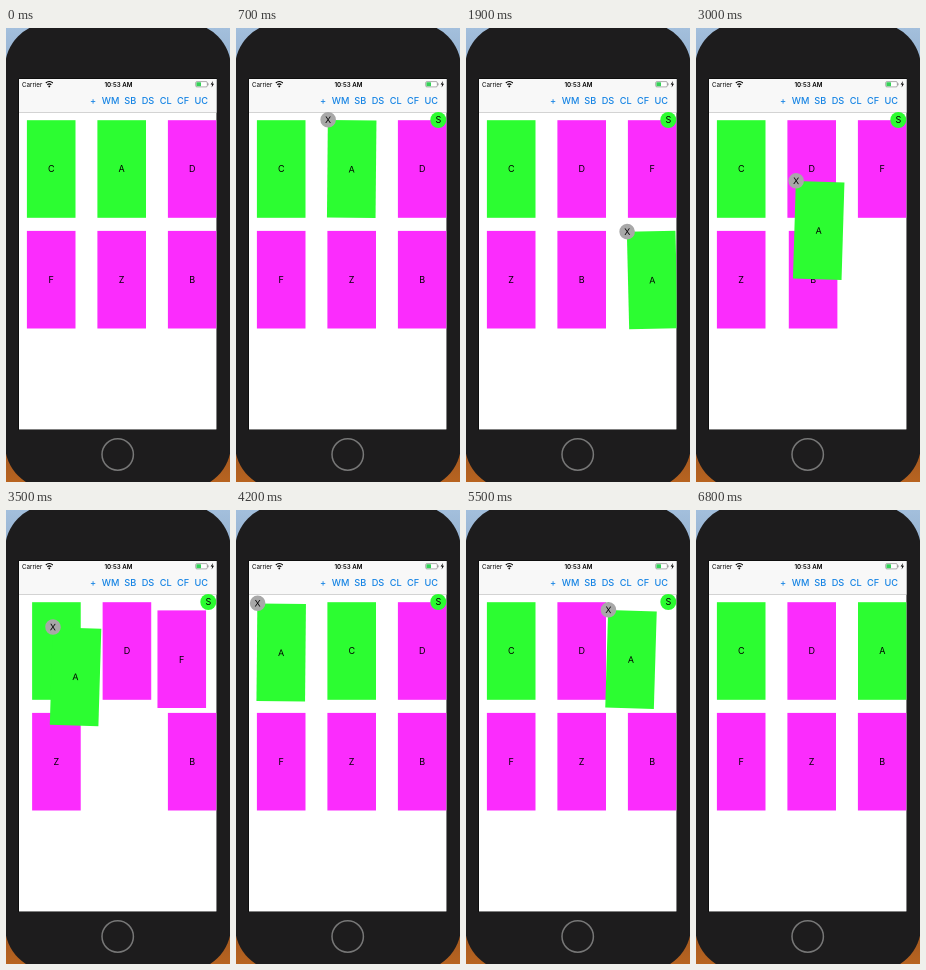
These frames come from a looping animation (224x454 px, 7.1 s). An HTML page:

```html
<!DOCTYPE html>
<html lang="en">
<head>
<meta charset="utf-8">
<title>Reordering cards</title>
<style>
  html, body { margin: 0; width: 100%; height: 100%; overflow: hidden; }
  svg { display: block; width: 224px; height: 454px; font-family: Inter, sans-serif; }
  text { text-anchor: middle; }
  .label { font-size: 9px; }
  .nav { font-size: 9.2px; fill: #1684e4; font-weight: 500; }
</style>
</head>
<body>
<svg viewBox="0 0 224 454">
  <defs>
    <linearGradient id="desk" x2="0" y2="1">
      <stop offset="0" stop-color="#a3bfdc"/>
      <stop offset=".5" stop-color="#56729a"/>
      <stop offset=".85" stop-color="#8a4a22"/>
      <stop offset="1" stop-color="#b86420"/>
    </linearGradient>
    <clipPath id="screen"><rect x="13" y="51" width="197.5" height="350.5"/></clipPath>
  </defs>
  <rect width="224" height="454" fill="url(#desk)"/>
  <rect x="-1" y="-5" width="226" height="466" rx="45" fill="#1d1c1d"/>
  <rect x="12.5" y="50.5" width="198.5" height="351.5" fill="#000"/>
  <rect x="13" y="51" width="197.5" height="350.5" fill="#fff"/>
  <rect x="13" y="51" width="197.5" height="33.5" fill="#f8f8f8"/>
  <path d="M13 84.5h197.5" stroke="#b9b9b9" stroke-width=".6"/>
  <circle cx="111.7" cy="426.5" r="15.7" fill="none" stroke="#777" stroke-width="1.5"/>

  <g font-size="6.2">
    <text x="16" y="58.6" style="text-anchor:start">Carrier</text>
    <text x="112.5" y="58.6" font-weight="600">10:53 AM</text>
  </g>
  <g fill="none" stroke="#000" stroke-width="1.1">
    <path d="M39.8 55a5 5 0 0 1 7 0M41.3 56.8a2.9 2.9 0 0 1 4 0"/>
    <circle cx="43.3" cy="58.4" r=".4"/>
  </g>
  <rect x="189.7" y="53.6" width="11.6" height="5.3" rx="1.2" fill="#fff" stroke="#777" stroke-width=".6"/>
  <rect x="190.4" y="54.3" width="4.6" height="3.9" rx=".5" fill="#35d158"/>
  <path d="M202 55.3v2" stroke="#777" stroke-width=".8"/>
  <path d="M207 53l-2.4 3.6h1.6l-.6 3 2.4-3.8h-1.6z"/>
  <g class="nav" id="nav"></g>

  <g id="cards" clip-path="url(#screen)"></g>
  <g id="done" class="label">
    <circle cx="202.3" cy="92" r="8" fill="#2cfd31"/>
    <text x="202.3" y="95.3">S</text>
  </g>
</svg>
<script>
const LOOP = 7100, STEP = 100, LAST = 6800;
const SHIFT = 300, EDIT_START = 500, EDIT_END = 6650;
const byId = id => document.getElementById(id);

const nav = { '+': 87, WM: 104.5, SB: 124.3, DS: 142, CL: 159.8, CF: 177.2, UC: 195.3 };
byId('nav').innerHTML = Object.entries(nav)
  .map(([name, x]) => `<text x="${x}" y="76.2">${name}</text>`).join('');

// Card order in the grid, from each time on
const orders = [
  [0, 'CADFZB'], [1500, 'CDFZBA'], [2975, 'CDFZAB'], [3450, 'ACDFZB'], [4850, 'CDAFZB']
];
// Path of the dragged card's centre: time, x, y
const drag = [
  [800, 115.7, 141], [1200, 154, 200.5], [1500, 184, 250], [1700, 186.3, 252],
  [2500, 186.3, 252], [3000, 122.7, 202.5], [3250, 100, 197], [3700, 45.2, 142.5],
  [4400, 45.2, 142.5], [4800, 113, 205], [5200, 150, 178], [5500, 165, 149.5],
  [5800, 146, 158], [6200, 166, 146], [6400, 166, 145], [6600, 186.3, 141]
];

const cards = {};
for (const name of 'CDFZBA') {
  const g = document.createElementNS('http://www.w3.org/2000/svg', 'g');
  const fill = 'CA'.includes(name) ? '#2cfd31' : '#fb2cfd';
  g.setAttribute('class', 'label');
  g.innerHTML = `<rect x="-24.3" y="-48.8" width="48.6" height="97.6" fill="${fill}"/>
    <text y="3.4">${name}</text>`;
  byId('cards').append(g);
  cards[name] = g;
}
cards.A.insertAdjacentHTML('beforeend', `<g id="remove">
  <circle cx="-24" cy="-49" r="7.8" fill="#a8a8a8"/><text x="-24" y="-45.7">X</text></g>`);

const clamp = v => Math.max(0, Math.min(1, v));
const ease = v => v * v * (3 - 2 * v);
const mix = (a, b, p) => a.map((v, i) => v + (b[i] - v) * p);
const slot = i => [45.2 + 70.5 * (i % 3), i < 3 ? 141 : 251.7];

function gridPosition(name, t) {
  let pos = slot(orders[0][1].indexOf(name));
  for (const [start, order] of orders)
    pos = mix(pos, slot(order.indexOf(name)), ease(clamp((t - start) / SHIFT)));
  return pos;
}

function dragPosition(t) {
  let pos = drag[0].slice(1);
  for (let i = 1; i < drag.length; i++) {
    const [from, to] = [drag[i - 1][0], drag[i][0]];
    pos = mix(pos, drag[i].slice(1), clamp((t - from) / (to - from)));
  }
  return pos;
}

function draw(now) {
  const t = Math.min(LAST, Math.floor(now % LOOP / STEP) * STEP);
  const editing = t >= EDIT_START && t < EDIT_END;
  for (const name in cards) {
    const pos = name === 'A' ? dragPosition(t) : gridPosition(name, t);
    const tilt = name === 'A' && editing ? 1.7 * Math.cos(2 * Math.PI * t / 250) : 0;
    cards[name].setAttribute('transform', `translate(${pos}) rotate(${tilt})`);
  }
  for (const id of ['remove', 'done']) byId(id).style.display = editing ? '' : 'none';
}

const begin = performance.now();
function tick() {
  draw(performance.now() - begin);
  requestAnimationFrame(tick);
}
tick();
</script>
</body>
</html>
```
